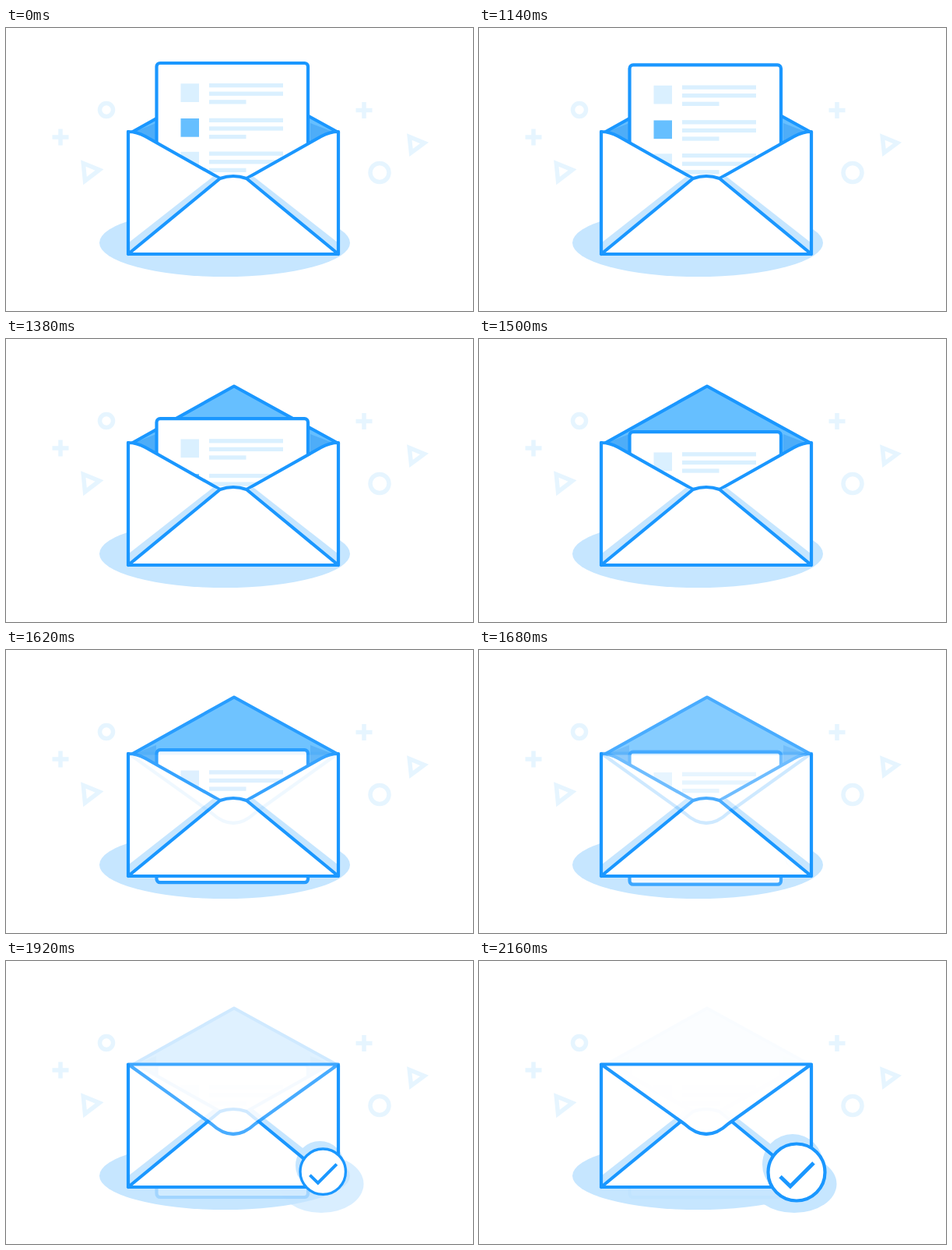
Animation, 600 px wide and 363 px high, one loop 3.06 s. Source, as an HTML page:

```html
<!DOCTYPE html>
<html lang="en">
<head>
<meta charset="utf-8">
<title>Letter into envelope</title>
<style>
  html, body { margin: 0; width: 100%; height: 100%; overflow: hidden; background: #fff; }
  svg { display: block; width: 100%; height: 100%; }
  .line { fill: none; stroke: #1a97ff; stroke-width: 4.2; stroke-linecap: round; stroke-linejoin: round; }
  .white { fill: #fff; }
  .soft { fill: #c6e6ff; }
  .deco { fill: none; stroke: #e6f5ff; stroke-width: 5.5; stroke-miterlimit: 8; }
</style>
</head>
<body>
<svg viewBox="0 0 600 363">
  <defs>
    <g id="sidePanel">
      <path class="white" d="M157 133Q168 133 179 139L275 193L157 290Z"/>
      <path class="line" d="M157 133Q168 133 179 139L275 193"/>
    </g>
    <path id="band" class="soft" d="M158 275L266 190.5L275 194L158 290Z"/>
    <path id="innerSide" fill="#4eadf8" d="M162 134L193 122V150Z"/>
    <path id="plus" class="deco" d="M-10.5 0H10.5M0 -10.5V10.5"/>
  </defs>

  <use href="#plus" x="70" y="140"/>
  <use href="#plus" x="460" y="105.5"/>
  <circle class="deco" cx="129" cy="105" r="8.5"/>
  <circle class="deco" cx="480" cy="185.5" r="12"/>
  <path class="deco" d="M99.3 173.5L120 182L101.5 196Z"/>
  <path class="deco" d="M518.3 139.5L537.5 147.5L520.5 160Z"/>

  <ellipse class="soft" cx="281" cy="275.5" rx="161" ry="43.5"/>
  <ellipse id="badgeShadow" class="soft" cx="405" cy="286" rx="54.5" ry="37"/>
  <path class="white" d="M157 133H427V290H157Z"/>

  <g id="open">
    <path fill="#66bfff" d="M161 134L293 60.5L427 134L292 210Z"/>
    <use href="#innerSide"/>
    <use href="#innerSide" transform="matrix(-1 0 0 1 584 0)"/>
    <path class="line" d="M161 134L293 60.5L427 134"/>
    <g id="paper">
      <rect class="line" style="fill:#fff" x="193.5" y="45" width="194.5" height="170" rx="4.5"/>
    </g>
    <use href="#sidePanel"/>
    <use href="#sidePanel" transform="matrix(-1 0 0 1 584 0)"/>
  </g>

  <use href="#band"/>
  <use href="#band" transform="matrix(-1 0 0 1 584 0)"/>
  <path class="white" d="M157 290L275 193Q292 187 309 193L427 290Z"/>
  <g class="pop"><circle class="soft" cx="403" cy="261" r="39"/></g>
  <path class="line" d="M157 133V290H427V134M157 290L275 193Q292 187 309 193L427 290"/>

  <path id="closed" class="line" style="fill:#fff" d="M157 132.5H427L320 209Q292 235 264 209Z"/>

  <g class="pop">
    <circle class="line" style="fill:#fff" cx="408" cy="271" r="36.5"/>
    <path class="line" style="stroke-width:5;stroke-linecap:butt;stroke-linejoin:miter" d="M387 276.5L400 289L430 259"/>
  </g>
</svg>
<script>
const LOOP = 3060, STEP = 60, LAST = 2160;
const byId = id => document.getElementById(id);
const paper = byId('paper'), open = byId('open'), closed = byId('closed');
const badgeShadow = byId('badgeShadow'), pops = document.querySelectorAll('.pop');

function addRect(x, y, width, height, fill) {
  const rect = document.createElementNS('http://www.w3.org/2000/svg', 'rect');
  for (const [name, value] of Object.entries({ x, y, width, height, fill })) rect.setAttribute(name, value);
  paper.append(rect);
}

[0, 44.7, 87.5].forEach((dy, i) => {
  addRect(224.5, 71.3 + dy, 23.5, 23.7, i === 1 ? '#66bfff' : '#daf0ff');
  [95, 95, 47.5].forEach((width, row) => addRect(261, 71 + dy + row * 10.6, width, 5.3, '#daf0ff'));
});

// cubic-bezier(.25, .1, .25, 1), solved by bisection
function ease(x) {
  if (x <= 0) return 0;
  if (x >= 1) return 1;
  let lo = 0, hi = 1;
  for (let i = 0; i < 24; i++) {
    const s = (lo + hi) / 2;
    if (0.75 * s * (1 - s) + s ** 3 < x) lo = s; else hi = s;
  }
  return 0.3 * lo * (1 - lo) ** 2 + 3 * lo * lo * (1 - lo) + lo ** 3;
}

const progress = (t, start, duration) => ease((t - start) / duration);

function draw(time) {
  const t = Math.min(LAST, Math.floor((time % LOOP) / STEP) * STEP);
  const fold = progress(t, 1564, 720);
  const pop = t >= LAST ? 1 : progress(t, 1670, 590);
  const scale = 0.3 + 0.7 * pop;

  paper.setAttribute('transform', `translate(0 ${88 * progress(t, 1108, 720)})`);
  open.setAttribute('opacity', 1 - fold);
  closed.setAttribute('opacity', fold);
  badgeShadow.setAttribute('opacity', progress(t, 1770, 390));
  for (const part of pops) {
    part.setAttribute('opacity', Math.min(1, 1.5 * pop));
    part.setAttribute('transform', `translate(404 267) scale(${scale}) translate(-404 -267)`);
  }
}

const begin = performance.now();
function tick() {
  draw(performance.now() - begin);
  requestAnimationFrame(tick);
}
draw(0);
requestAnimationFrame(tick);
</script>
</body>
</html>
```
